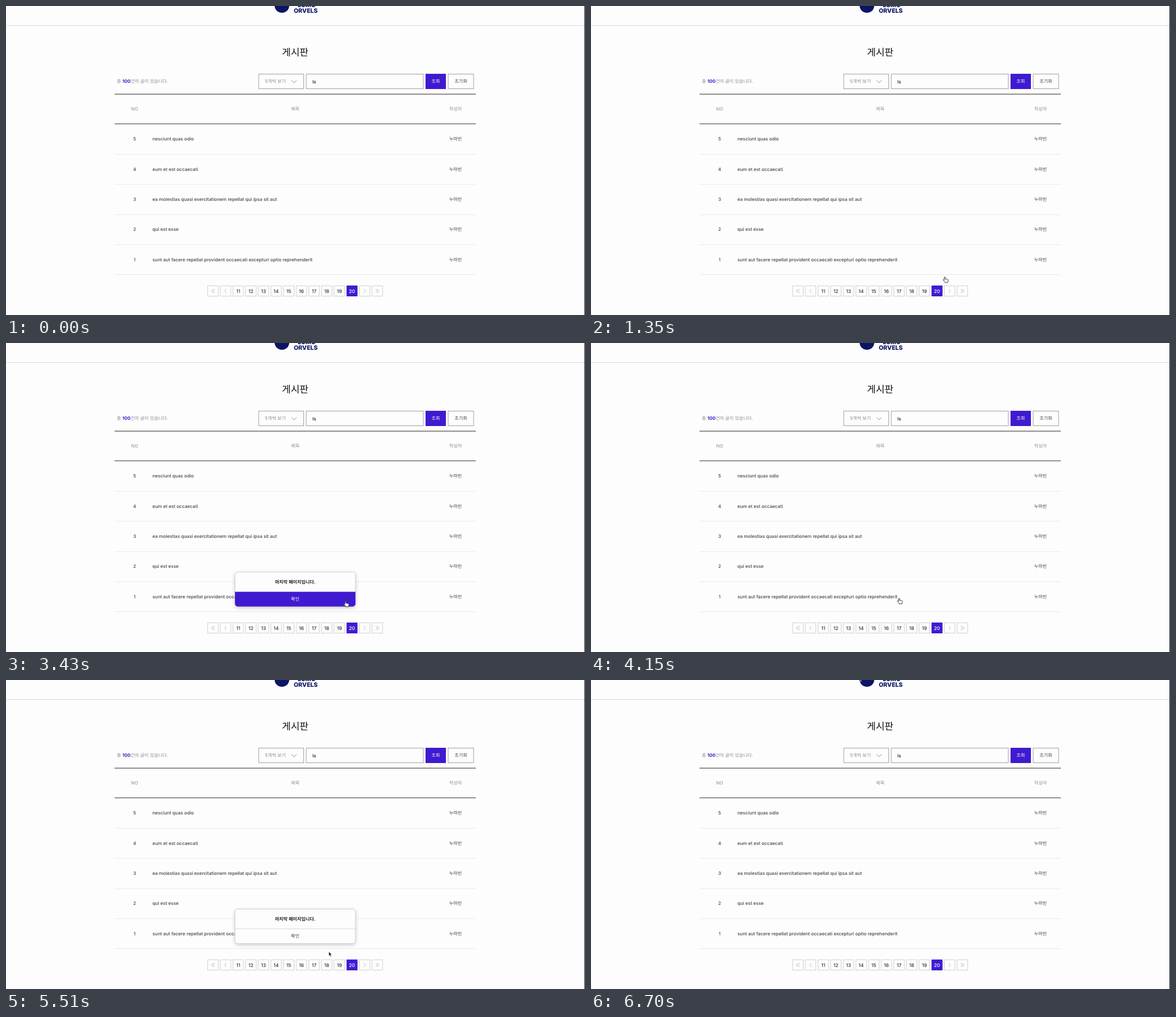
Write an HTML page that moves like this. It is 1024 px wide and 547 px high and loops after 6800 ms.

```html
<!DOCTYPE html>
<html lang="ko">
<head>
<meta charset="utf-8">
<title>게시판</title>
<style>
  html, body { margin: 0; width: 100%; height: 100%; overflow: hidden; background: #fdfdfd; }
  svg {
    display: block;
    font: 500 8.1px Inter, 'Noto Sans CJK KR', 'Noto Sans CJK', sans-serif;
    text-rendering: geometricPrecision;
    fill: #444;
  }
  .mid { text-anchor: middle; }
  .dim { fill: #8c8c8c; font-weight: 400; }
  .box { fill: #fdfdfd; stroke: #a0a09c; }
  .brand { fill: #401ad0; }
  .white { fill: #fff; }
  .icon { fill: none; stroke: #b4b4b4; stroke-width: .9; }
  .shadow { filter: drop-shadow(0 2px 3px rgba(0, 0, 0, .2)); }

  #modal, #hover, #hand, #arrow { animation: 6.8s step-end infinite; }
  #modal { animation-name: modal; }
  #hover { animation-name: hover; }
  #hand { animation-name: hand; }
  #arrow { animation-name: arrow; }
  #cursor { animation: move 6.8s linear infinite; }

  @keyframes modal {
    0%, 61.02%, 90.29% { visibility: hidden; }
    43.67%, 75.29% { visibility: visible; }
  }
  @keyframes hover {
    0%, 61.02%, 90.29% { visibility: hidden; }
    50%, 82.87% { visibility: visible; }
  }
  @keyframes hand {
    0%, 43.67%, 65.04%, 75.29%, 97.34% { visibility: hidden; }
    13.82%, 50%, 68.3%, 82.87% { visibility: visible; }
  }
  @keyframes arrow {
    0%, 50%, 68.3%, 82.87% { visibility: hidden; }
    43.67%, 65.04%, 75.29%, 97.34% { visibility: visible; }
  }
  @keyframes move {
    0%, 13.82% { transform: translate(607px, 311px); animation-timing-function: cubic-bezier(.3, 0, .3, 1); }
    23.82% { transform: translate(629px, 508px); }
    27.06%, 33.52% { transform: translate(629px, 509px); animation-timing-function: ease-in-out; }
    35.29% { transform: translate(626px, 505px); animation-timing-function: ease-in-out; }
    37.5% { transform: translate(632px, 508px); }
    39.85%, 46.5% { transform: translate(631px, 508.5px); animation-timing-function: ease-in; }
    50.44% { transform: translate(601px, 457px); animation-timing-function: ease-out; }
    54.41%, 61.3% { transform: translate(545px, 452px); animation-timing-function: cubic-bezier(.4, 0, .6, .85); }
    68.09% { transform: translate(625.5px, 495px); animation-timing-function: ease-out; }
    70.59%, 71.3% { transform: translate(632px, 508px); }
    72.94%, 76.18% { transform: translate(634px, 509px); animation-timing-function: cubic-bezier(.4, 0, .7, .8); }
    81.03% { transform: translate(571px, 481px); animation-timing-function: ease-out; }
    85.29% { transform: translate(552px, 457px); }
    86.9%, 94.5% { transform: translate(550px, 457px); animation-timing-function: ease-in; }
    98.52%, 100% { transform: translate(474px, -6px); }
  }
</style>
</head>
<body>
<svg width="1024" height="547" viewBox="0 0 1024 547">
  <rect width="1024" height="547" fill="#fdfdfd"/>
  <rect y="34" width="1023" height="1" fill="#d6d6e6"/>
  <rect x="1023" width="1" height="547" fill="#1c1c2c"/>

  <g fill="#0c1464" font-size="10.5" font-weight="800">
    <circle cx="488" cy="-1" r="13"/>
    <text x="516" y="2">LUMO</text>
    <text x="509" y="12">ORVELS</text>
  </g>

  <text class="mid" x="511.5" y="88" font-size="17" fill="#111">게시판</text>
  <text class="dim" x="196" y="136.4">총 <tspan class="brand" font-weight="700">100</tspan>건의 글이 있습니다.</text>

  <rect class="box" x="447" y="120.5" width="79.5" height="26"/>
  <text class="dim" x="458" y="136.4">5개씩 보기</text>
  <path d="M505 131.5l4.5 4.5 4.5-4.5" fill="none" stroke="#8c8c8c"/>
  <rect class="box" x="531" y="120.5" width="207" height="26"/>
  <text x="542" y="136.6" fill="#111">ls</text>
  <rect class="brand" x="742" y="120" width="36" height="27"/>
  <text class="mid white" x="760" y="136.4">조회</text>
  <rect class="box" x="782" y="120.5" width="45" height="26"/>
  <text class="mid" x="804.5" y="136.4">초기화</text>

  <g fill="#706c66">
    <rect x="192" y="155.3" width="639" height="1.5"/>
    <rect x="192" y="207.8" width="639" height="1.5"/>
  </g>
  <text class="mid dim" x="227.5" y="185.2">NO</text>
  <text class="mid dim" x="511.5" y="185.2">제목</text>
  <text class="mid dim" x="795" y="185.2">작성자</text>
  <g id="rows"></g>
  <g id="pager"></g>

  <g id="modal">
    <rect class="shadow" x="405" y="405.5" width="213" height="61" rx="5" fill="#fdfdfd" stroke="#c8c8cc" stroke-width=".8"/>
    <rect x="405" y="440" width="213" height="1" fill="#d8d8e0"/>
    <text class="mid" x="511.5" y="426.4" font-weight="700" fill="#222">마지막 페이지입니다.</text>
    <text class="mid" x="511.5" y="456.4">확인</text>
    <g id="hover">
      <path class="brand" d="M405 440.5h213v21a5 5 0 0 1-5 5h-203a5 5 0 0 1-5-5z"/>
      <text class="mid white" x="511.5" y="456.4">확인</text>
    </g>
  </g>

  <g id="cursor" stroke-linejoin="round">
    <path id="hand" fill="#fff" stroke="#222" stroke-width=".9"
      d="M-1 .9q0-1 .9-1t1 1v3l1-.4 1.2.4 1.2.2 1.2.5q.5.5.3 2l-.8 1.8v1.4h-5l-.5-1.3-2.4-3q-.4-1 .6-1.2l1.3 1z"/>
    <path id="arrow" fill="#111" stroke="#fff" stroke-width=".6"
      d="M0 0v7.6l1.8-1.6 1.3 3 1.3-.6-1.3-2.9h2.4z"/>
  </g>
</svg>
<script>
  const posts = [
    'sunt aut facere repellat provident occaecati excepturi optio reprehenderit',
    'qui est esse',
    'ea molestias quasi exercitationem repellat qui ipsa sit aut',
    'eum et est occaecati',
    'nesciunt quas odio'
  ];
  const author = '누마빈';

  const row = (title, i) => {
    const y = 451.6 - 53.35 * i;
    return `<text class="mid" x="227.5" y="${y}">${i + 1}</text>
      <text x="259" y="${y}">${title}</text>
      <text class="mid" x="795" y="${y}">${author}</text>
      <rect x="192" y="${Math.round(y + 23.6)}" width="639" height="1" fill="#eaeaee"/>`;
  };
  document.getElementById('rows').innerHTML = posts.map(row).join('');

  const chevron = (x, dir) => `<path class="icon" d="M${x - 1.7 * dir} 501l${3.4 * dir} 3.5l${-3.4 * dir} 3.5"/>`;
  const pageBox = i => {
    const x = 366 + 22.36 * i;
    const page = i + 9;
    const current = page === 20;
    const frame = current
      ? `<rect class="brand" x="${x - 9.7}" y="494.8" width="19.4" height="19.2"/>`
      : `<rect class="box" x="${x - 9.3}" y="495.2" width="18.6" height="18.4" style="stroke:#cfcfca"/>`;
    if (i > 1 && i < 12) {
      return frame + `<text class="mid" x="${x}" y="507.5" font-size="8.5" fill="${current ? '#fff' : '#333'}">${page}</text>`;
    }
    const dir = i < 2 ? -1 : 1;
    const double = i === 0 || i === 13;
    return frame + (double ? chevron(x - 1.3, dir) + chevron(x + 1.5, dir) : chevron(x, dir));
  };
  document.getElementById('pager').innerHTML = Array.from({ length: 14 }, (_, i) => pageBox(i)).join('');
</script>
</body>
</html>
```
